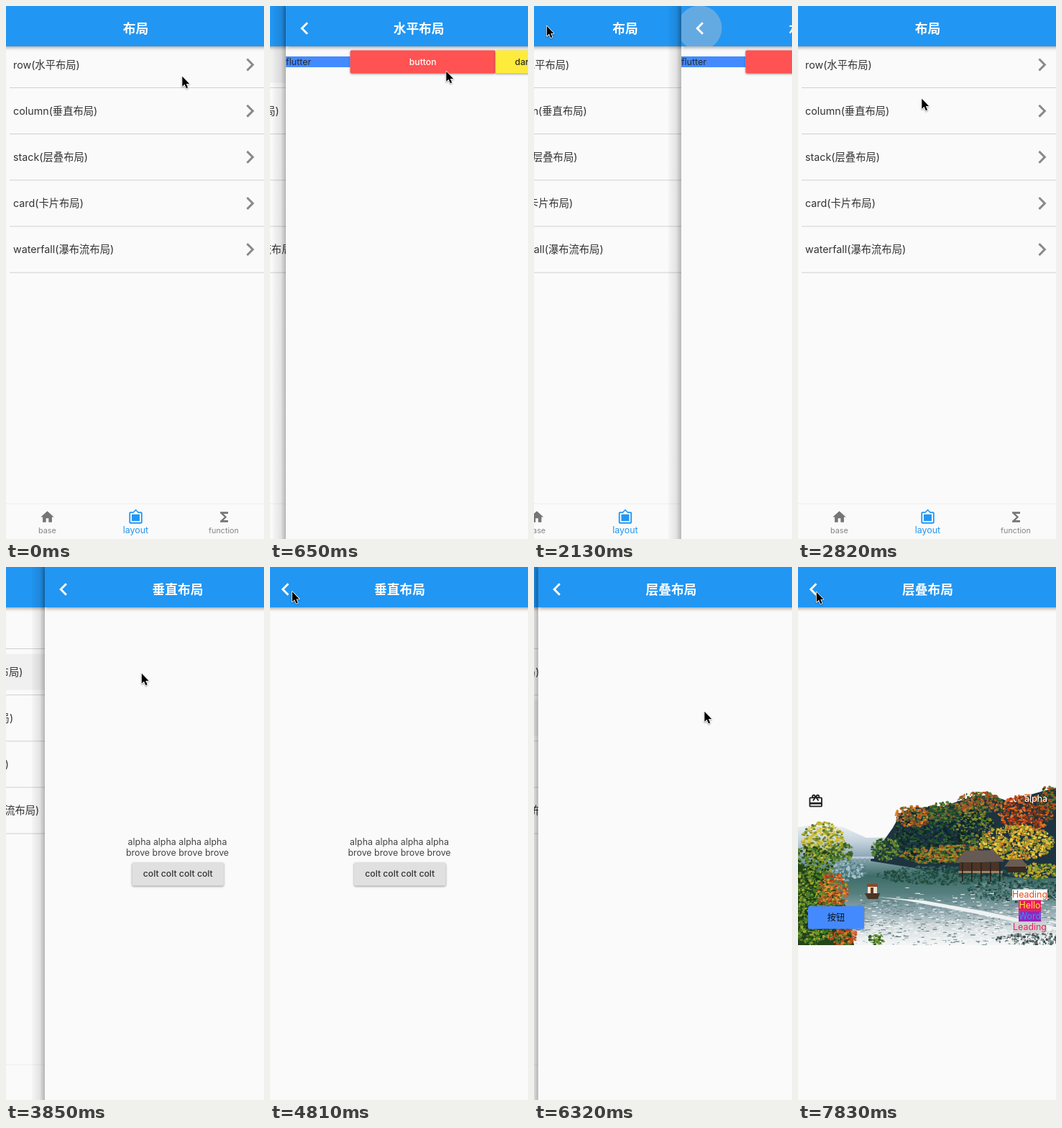
Write an HTML page with a canvas that moves like this. It is 359 by 740 pixels and loops after 8000 ms.

```html
<!DOCTYPE html>
<html lang="zh">
<head>
<meta charset="utf-8">
<style>
  html, body { margin: 0; width: 100%; height: 100%; overflow: hidden; background: #fafafa; }
  canvas { display: block; width: 359px; height: 740px; }
</style>
</head>
<body>
<canvas></canvas>
<script>
const W = 359, H = 740, LOOP = 8000;
// The phone screen is slightly wider than the stage and cropped on both sides.
const LEFT = -4.5, SCREEN = 370, RIGHT = LEFT + SCREEN;
const FONT = 'Inter, "Noto Sans CJK SC", "Noto Sans CJK", sans-serif';
const BLUE = '#2196f3', ACCENT = '#448aff', INK = '#333';

const ICONS = {
  chevron: 'M10 6 8.59 7.41 13.17 12l-4.58 4.59L10 18l6-6z',
  back: 'M15.41 7.41 14 6l-6 6 6 6 1.41-1.41L10.83 12z',
  home: 'M10 20v-6h4v6h5v-8h3L12 3 2 12h3v8z',
  frame: 'M20 4h-4l-4-4-4 4H4c-1.1 0-2 .9-2 2v14c0 1.1.9 2 2 2h16c1.1 0 2-.9 2-2V6c0-1.1-.9-2-2-2zm0 16H4V6h4.52l3.52-3.5L15.52 6H20zM18 8H6v10h12z',
  sum: 'M18 4H6v2l6.5 6L6 18v2h12v-3h-7l5-5-5-5h7z',
  gift: 'M20 6h-2.18c.11-.31.18-.65.18-1 0-1.66-1.34-3-3-3-1.05 0-1.96.54-2.5 1.35l-.5.67-.5-.68C10.96 2.54 10.05 2 9 2 7.34 2 6 3.34 6 5c0 .35.07.69.18 1H4c-1.11 0-1.99.89-1.99 2L2 19c0 1.11.89 2 2 2h16c1.11 0 2-.89 2-2V8c0-1.11-.89-2-2-2zm-5-2c.55 0 1 .45 1 1s-.45 1-1 1-1-.45-1-1 .45-1 1-1zM9 4c.55 0 1 .45 1 1s-.45 1-1 1-1-.45-1-1 .45-1 1-1zm11 15H4v-2h16zm0-5H4V8h5.08L7 10.83 8.62 12 11 8.76l1-1.36 1 1.36L15.38 12 17 10.83 14.92 8H20z'
};
for (const name in ICONS) ICONS[name] = new Path2D(ICONS[name]);
const ARROW = new Path2D('M0 0V14L3.2 11 5.6 16.5 7.8 15.5 5.5 10.2H9.8Z');

const canvas = document.querySelector('canvas');
const ratio = window.devicePixelRatio || 1;
canvas.width = W * ratio;
canvas.height = H * ratio;
let ctx = canvas.getContext('2d');

const clamp = v => Math.max(0, Math.min(1, v));

function rect(x, y, w, h, color) {
  ctx.fillStyle = color;
  ctx.fillRect(x, y, w, h);
}

function shape(color, points) {
  ctx.fillStyle = color;
  ctx.beginPath();
  for (let i = 0; i < points.length; i += 2) ctx.lineTo(points[i], points[i + 1]);
  ctx.fill();
}

function text(str, x, y, size, color = INK, align = 'center', weight = 400) {
  ctx.font = `${weight} ${size}px ${FONT}`;
  ctx.textAlign = align;
  ctx.fillStyle = color;
  ctx.fillText(str, x, y);
}

function icon(name, x, y, scale, color) {
  ctx.save();
  ctx.translate(x, y);
  ctx.scale(scale, scale);
  ctx.translate(-12, -12);
  ctx.fillStyle = color;
  ctx.fill(ICONS[name], 'evenodd');
  ctx.restore();
}

function withShadow(blur, dy, alpha, draw) {
  ctx.save();
  ctx.shadowColor = `rgba(0,0,0,${alpha})`;
  ctx.shadowBlur = blur * ratio;
  ctx.shadowOffsetY = dy * ratio;
  draw();
  ctx.restore();
}

function button(label, x, y, w, h, fill, color, baseline) {
  withShadow(3, 1, .4, () => {
    ctx.fillStyle = fill;
    ctx.beginPath();
    ctx.roundRect(x, y, w, h, 2);
    ctx.fill();
  });
  text(label, x + w / 2, baseline, 12.2, color, 'center', 500);
}

function appBar(title) {
  withShadow(5, 1.5, .4, () => rect(LEFT, 0, SCREEN, 56, BLUE));
  text(title, 180.5, 37.7, 17.7, '#fff', 'center', 600);
}

// --- Pages ---

const ROWS = ['row(水平布局)', 'column(垂直布局)', 'stack(层叠布局)', 'card(卡片布局)', 'waterfall(瀑布流布局)'];

function listPage(pressedRow) {
  rect(LEFT, 0, SCREEN, H, '#fafafa');
  ROWS.forEach((label, i) => {
    const y = 81.5 + i * 64.15;
    if (i === pressedRow) rect(LEFT, y - 25, SCREEN, 50, '#f0f0f0');
    text(label, 10, y + 5.3, 14.3, INK, 'left');
    icon('chevron', 339.5, y, 1.5, '#8a8a8a');
    rect(5, y + 31.5, RIGHT - 5, 1, '#d0d0d0');
  });
  appBar('布局');
  rect(LEFT, 690.5, SCREEN, 1, '#ededed');
  icon('home', 57.5, 709.5, .917, '#757575');
  icon('frame', 180.5, 709.5, .917, BLUE);
  icon('sum', 303.5, 709.5, .917, '#757575');
  text('base', 57.3, 732, 10.8, '#858585');
  text('layout', 180.5, 731.7, 12.4, BLUE);
  text('function', 303, 732, 10.8, '#858585');
}

function rowPage() {
  rect(LEFT, 70, 89.5, 15, ACCENT);
  text('flutter', LEFT, 81.5, 12.5, '#2b2b2b', 'left');
  button('button', 85, 61.5, 202, 32, '#ff5252', '#fff', 81.5);
  button('dart', 287, 61.5, 78, 32, '#ffeb3b', '#2b2b2b', 81.5);
}

function columnPage() {
  text('alpha alpha alpha alpha', 180, 386, 12.4, '#444');
  text('brove brove brove brove', 180, 401, 12.4, '#444');
  button('colt colt colt colt', 117, 410.5, 127.5, 32, '#e0e0e0', INK, 430.3);
}

function stackPage(t) {
  if (t < 6480) return;
  ctx.drawImage(photo, LEFT, 300, SCREEN, 225);
  icon('gift', 24.7, 325, .92, '#212121');
  text('alpha', 331, 326, 12.4, '#fff');
  const lines = [
    ['Heading', 49, '#fff', '#e64a19'],
    ['Hello', 31, '#f0145f', '#ffeb3b'],
    ['Word', 31, '#9427b8', ACCENT],
    ['Leading', 47, '#d2d2d2', '#f0205f']
  ];
  lines.forEach(([label, w, back, color], i) => {
    rect(322.5 - w / 2, 447.5 + i * 15, w, 15, back);
    text(label, 322.5, 459 + i * 15, 12.4, color);
  });
  button('按钮', 14, 471, 78, 31.5, ACCENT, '#111', 491.3);
}

// --- Landscape picture, painted once ---

function paintPhoto() {
  const picture = document.createElement('canvas');
  picture.width = SCREEN * 2;
  picture.height = 450;
  const screenCtx = ctx;
  ctx = picture.getContext('2d');
  ctx.scale(2, 2);
  ctx.translate(-LEFT, -300);

  let seed = 11;
  const random = () => (seed = seed * 16807 % 2147483647) / 2147483647;
  const leaves = (cx, cy, rx, ry, ...colors) => {
    for (let i = 0; i < rx * ry * .55; i++) {
      const angle = random() * 2 * Math.PI, d = Math.sqrt(random());
      ctx.fillStyle = colors[Math.floor(random() * colors.length)];
      ctx.beginPath();
      ctx.ellipse(cx + rx * d * Math.cos(angle), cy + ry * d * Math.sin(angle),
        .8 + random() * 1.8, .6 + random() * 1.4, 0, 0, 7);
      ctx.fill();
    }
  };
  const fade = (y0, y1, ...colors) => {
    const gradient = ctx.createLinearGradient(0, y0, 0, y1);
    colors.forEach((color, i) => gradient.addColorStop(i / (colors.length - 1), color));
    return gradient;
  };

  rect(LEFT, 300, SCREEN, 225, '#fafafa');
  shape(fade(355, 408, '#f2f5f7', '#c3d2dc', '#7f9cae'),
    [LEFT, 362, 25, 357, 62, 361, 95, 376, 135, 375, 135, 408, LEFT, 408]);
  rect(LEFT, 405, SCREEN, 120,
    fade(405, 525, '#86a5ad', '#3f6c68', '#55807f', '#8fa8ae', '#d5dddf', '#f4f6f6'));

  // Forest on the far bank
  shape('#1d3340', [100, 408, 115, 386, 132, 362, 144, 340, 165, 333, 190, 338, 215, 328,
    245, 318, 270, 317, 300, 328, 320, 317, 345, 310, RIGHT, 306, RIGHT, 432, 240, 430, 150, 416]);
  leaves(190, 372, 55, 40, '#0e2430', '#16324a', '#1f4a2e', '#2f6130', '#10261c');
  leaves(122, 392, 20, 16, '#2f6130', '#5d8230', '#1f4a2e', '#7d9638');
  leaves(160, 346, 25, 15, '#c9582a', '#8a4420', '#d98a34', '#4f6a28', '#a86a28');
  leaves(205, 340, 24, 14, '#2f6130', '#5d8230', '#8a5a24', '#1f4a2e');
  leaves(252, 328, 32, 16, '#b5481f', '#6f7a2c', '#8a5a24', '#2f5a2a', '#c9702c');
  leaves(245, 362, 28, 24, '#10261c', '#16324a', '#4f7a2c', '#8a8a2c');
  leaves(318, 342, 38, 26, '#b03a16', '#d65420', '#7a2c14', '#e07a30', '#3f4a20');
  leaves(350, 322, 16, 18, '#b5481f', '#5c7a2c', '#24401f');
  leaves(180, 400, 40, 11, '#3a6a2a', '#8a7a2c', '#b56a28', '#10261c');
  leaves(222, 398, 42, 13, '#7d8a30', '#b8862c', '#2f5a2a', '#a05424');
  leaves(305, 383, 52, 24, '#dcb62c', '#b8a42c', '#f0d04a', '#6f8a2c', '#c97a28');
  leaves(330, 422, 36, 11, '#8fa034', '#3f6a2c', '#c9a52c');
  leaves(333, 310, 3, 2, '#f6f8f8');

  // Reflections, sunlit ripples and the boat's wake
  leaves(205, 428, 95, 13, '#1f4a44', '#2c5c54', '#3f7068', '#234a38');
  leaves(310, 450, 75, 15, '#1f403c', '#2c5c54', '#46706a', '#6f9090');
  leaves(70, 422, 24, 14, '#7fa3ad', '#a9c3cc', '#4f7a80');
  for (let i = 0; i < 1300; i++) {
    const depth = Math.sqrt(random());
    ctx.fillStyle = random() < .35 + .45 * depth ? '#f6f8f8' : '#61777f';
    ctx.fillRect(80 + random() * 285, 440 + 85 * depth, 1 + random() * 6, .4 + random() * .9);
  }
  leaves(330, 517, 55, 8, '#5a6668', '#8a9696', '#39484a', '#f4f6f6');
  shape('#eef2f2', [110, 458, 175, 463, 260, 478, RIGHT, 501, RIGHT, 505, 240, 480, 150, 463]);

  // Lakeside huts, bridge and boat
  shape('#655a54', [219, 411, 232, 394, 272, 393, 287, 409]);
  rect(225, 410, 56, 13, '#4a3426');
  rect(223, 422, 62, 3, '#9c8468');
  shape('#6a5c50', [287, 416, 295, 406, 312, 406, 320, 416]);
  rect(291, 416, 26, 8, '#3b2a20');
  for (let x = 228; x < 285; x += 13) rect(x, 410, 1.6, 27, '#2b211b');
  rect(74, 402, 32, 3, '#b9c9d6');
  for (let x = 78; x < 104; x += 7) rect(x, 404, 2, 6, '#8fa5b5');
  shape('#4a3527', [93, 453, 114, 453, 111, 461, 97, 461]);
  rect(96, 440, 15, 4, '#8a4a28');
  rect(97, 444, 13, 9, '#eee4d2');
  rect(101, 445, 4, 8, '#6b3a24');

  // Near bank on the left
  leaves(35, 380, 30, 26, '#c9b832', '#8f9c2e', '#e0cc4a', '#5c7a2c');
  leaves(60, 396, 18, 13, '#4f7a2c', '#8f9c2e', '#33602a');
  leaves(18, 412, 32, 24, '#2f6124', '#5c8a2c', '#1c3a18', '#8f9c2e');
  shape('#23451c', [LEFT, 410, 25, 422, 50, 440, 66, 470, 78, 525, LEFT, 525]);
  leaves(20, 470, 34, 55, '#3f7a22', '#6f9a2c', '#1c3a18', '#a0a832', '#4f7a2c');
  leaves(48, 452, 22, 28, '#d0602a', '#b03a16', '#e8903a', '#5c7a2c');
  leaves(62, 512, 20, 13, '#c54a1f', '#e07a30', '#4f7a2c');
  leaves(109, 517, 12, 7, '#6f9a2c', '#33602a');

  ctx = screenCtx;
  return picture;
}
const photo = paintPhoto();

// --- Motion ---

const SCENES = [
  { title: '水平布局', draw: rowPage, push: 470, pop: 2053, ripple: 1950 },
  { title: '垂直布局', draw: columnPage, push: 3714, pop: 5042, ripple: 4960 },
  { title: '层叠布局', draw: stackPage, push: 6130, pushTime: 284, pop: Infinity, ripple: Infinity }
];

// Decelerating cubic bezier (.35,.91,.33,.97), solved by bisection.
function slide(x) {
  x = clamp(x);
  if (x === 0 || x === 1) return x;
  const curve = (s, a, b) => 3 * (1 - s) * (1 - s) * s * a + 3 * (1 - s) * s * s * b + s ** 3;
  let lo = 0, hi = 1;
  for (let i = 0; i < 20; i++) {
    const mid = (lo + hi) / 2;
    if (curve(mid, .35, .33) < x) lo = mid; else hi = mid;
  }
  return curve(lo, .91, .97);
}

const CURSOR = [
  [0, 245, 97], [50, 245, 97], [170, 245, 90], [1090, 245, 90], [1210, 225, 114], [1400, 90, 66],
  [1580, 16, 18], [1700, 16, 18], [1830, 17.5, 27], [2200, 17.5, 27], [2700, 172, 128],
  [2820, 172, 128], [3050, 188.5, 147], [4290, 188.5, 147], [4870, 26, 30], [5050, 26, 30],
  [5340, 211, 151], [5820, 257, 208], [6160, 257, 208], [6320, 237, 200], [6730, 208, 219],
  [6970, 208, 219], [7770, 27, 35], [7830, 25.5, 34], [LOOP, 25.5, 34]
];

function drawCursor(t) {
  const i = CURSOR.findIndex(key => key[0] > t);
  const [t0, x0, y0] = CURSOR[i - 1], [t1, x1, y1] = CURSOR[i];
  const u = (t - t0) / (t1 - t0), k = u * u * (3 - 2 * u);
  ctx.save();
  ctx.translate(x0 + (x1 - x0) * k + .3, y0 + (y1 - y0) * k + .8);
  ctx.lineJoin = 'round';
  ctx.lineWidth = 1.6;
  ctx.strokeStyle = '#fff';
  withShadow(2, 1, .4, () => ctx.stroke(ARROW));
  ctx.fillStyle = '#000';
  ctx.fill(ARROW);
  ctx.restore();
}

function drawRipple(age) {
  if (age < 0 || age > 500) return;
  ctx.save();
  ctx.beginPath();
  ctx.rect(LEFT, 0, SCREEN, 57);
  ctx.clip();
  ctx.fillStyle = `rgba(200,200,200,${.4 * clamp((500 - age) / 250)})`;
  ctx.beginPath();
  ctx.arc(21, 30.5, 12 + 19 * clamp(age / 170), 0, 7);
  ctx.fill();
  ctx.restore();
}

function drawPage(scene, t, offset) {
  ctx.save();
  ctx.translate(offset, 0);
  if (offset > 0) {
    const edge = ctx.createLinearGradient(LEFT - 18, 0, LEFT, 0);
    edge.addColorStop(0, 'rgba(0,0,0,.02)');
    edge.addColorStop(.6, 'rgba(0,0,0,.09)');
    edge.addColorStop(1, 'rgba(0,0,0,.28)');
    rect(LEFT - 18, 0, 18, H, edge);
  }
  rect(LEFT, 0, SCREEN, H, '#fafafa');
  appBar(scene.title);
  drawRipple(t - scene.ripple);
  icon('back', 21.5, 31, 1.45, '#fff');
  scene.draw(t);
  ctx.restore();
}

function render(t) {
  ctx.setTransform(ratio, 0, 0, ratio, 0, 0);
  const index = SCENES.findIndex(s => t >= s.push && t < s.pop + 350);
  const scene = SCENES[index];
  const shown = scene
    ? slide((t - scene.push) / (scene.pushTime || 350)) - slide((t - scene.pop) / 350)
    : 0;
  ctx.save();
  ctx.translate(-shown * SCREEN / 3, 0);
  listPage(scene && t < scene.pop ? index : -1);
  ctx.restore();
  if (scene) drawPage(scene, t, (1 - shown) * SCREEN);
  drawCursor(t);
}

const start = performance.now();
function frame() {
  render((performance.now() - start) % LOOP);
  requestAnimationFrame(frame);
}
frame();
</script>
</body>
</html>
```
